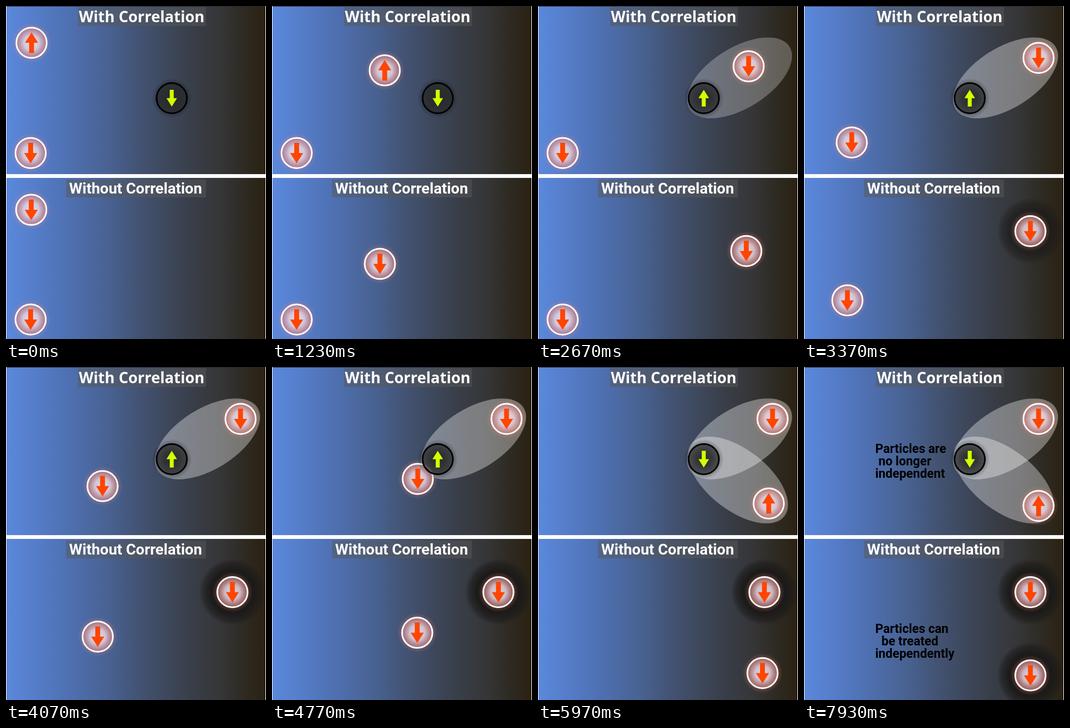
These frames come from a looping animation (480 px wide and 616 px high, 7960 ms). An HTML page:

```html
<!DOCTYPE html>
<html lang="en">
<head>
<meta charset="utf-8">
<title>Particle correlation</title>
<style>
  html, body { margin: 0; width: 100%; height: 100%; overflow: hidden; background: #fff; }
  svg { display: block; width: 480px; height: 616px; }
  text { white-space: pre; }
  .title { font-weight: 700; font-size: 28px; fill: #fff; }
  .wide { font-family: "Open Sans", "Noto Sans", sans-serif; }
  .plain { font-family: Roboto, Arial, sans-serif; }
  .note { font: 700 23px Roboto, Arial, sans-serif; fill: #000; }
  .label { fill: rgb(89, 89, 89); fill-opacity: .5; }
  .orbital { fill: #fff; fill-opacity: .35; }
</style>
</head>
<body>
<svg viewBox="0 0 480 616">
  <defs>
    <linearGradient id="sky" gradientUnits="userSpaceOnUse" x1="1" x2="479">
      <stop offset="0" stop-color="#5b88dc"/>
      <stop offset=".21" stop-color="#5073b7"/>
      <stop offset=".42" stop-color="#475f8c"/>
      <stop offset=".5" stop-color="#435475"/>
      <stop offset=".63" stop-color="#3d475a"/>
      <stop offset=".73" stop-color="#383d46"/>
      <stop offset=".835" stop-color="#353536"/>
      <stop offset=".92" stop-color="#2e2a22"/>
      <stop offset="1" stop-color="#2a2112"/>
    </linearGradient>
    <radialGradient id="core">
      <stop offset="0" stop-color="#eae6f4" stop-opacity=".9"/>
      <stop offset=".5" stop-color="#e4d8e6" stop-opacity=".82"/>
      <stop offset="1" stop-color="#c87878" stop-opacity=".5"/>
    </radialGradient>
    <radialGradient id="warm">
      <stop offset=".72" stop-color="#ff826e" stop-opacity=".3"/>
      <stop offset="1" stop-color="#ff826e" stop-opacity="0"/>
    </radialGradient>
    <radialGradient id="dim">
      <stop offset="0" stop-color="#262829" stop-opacity=".96"/>
      <stop offset=".5" stop-color="#292b2c" stop-opacity=".85"/>
      <stop offset="1" stop-color="#2c2c2c" stop-opacity=".55"/>
    </radialGradient>
    <radialGradient id="shade">
      <stop offset=".72" stop-color="#111" stop-opacity=".35"/>
      <stop offset="1" stop-color="#111" stop-opacity="0"/>
    </radialGradient>
    <radialGradient id="hole">
      <stop offset="0" stop-color="#1b1a19"/>
      <stop offset=".65" stop-color="#1b1a19" stop-opacity=".95"/>
      <stop offset=".85" stop-color="#1b1a19" stop-opacity=".55"/>
      <stop offset="1" stop-color="#1b1a19" stop-opacity="0"/>
    </radialGradient>
    <g id="ball">
      <circle r="37" fill="url(#warm)"/>
      <circle r="28" fill="url(#core)" stroke="#fff" stroke-width="3"/>
    </g>
    <path id="arrow" d="M0-19L12 0H4.5V19H-4.5V0H-12Z"/>
    <clipPath id="upper"><rect x="1" width="478" height="311"/></clipPath>
    <clipPath id="lower"><rect x="1" y="318" width="478" height="298"/></clipPath>
  </defs>

  <g clip-path="url(#upper)">
    <rect x="1" width="478" height="311" fill="url(#sky)"/>
    <rect width="480" height="1" fill="#242830"/>
    <rect class="label" x="133" y="2" width="236" height="35"/>
    <text class="title wide" x="134.5" y="30">With Correlation</text>
    <ellipse id="orbitA" class="orbital" rx="109" ry="56" transform="translate(372 133) rotate(-32)"/>
    <ellipse id="orbitB" class="orbital" rx="109" ry="56" transform="translate(369 209) rotate(38)"/>
    <g id="topBalls"></g>
    <g transform="translate(306 170.5)">
      <circle r="37" fill="url(#shade)"/>
      <circle r="28" fill="url(#dim)" stroke="#000" stroke-width="3"/>
      <use id="pivot" href="#arrow" fill="#d4ff00"/>
    </g>
    <text class="note" id="noteA"><tspan x="131.5" y="159">Particles are</tspan><tspan x="137.5" y="182">no longer</tspan><tspan x="131.5" y="205">independent</tspan></text>
  </g>

  <g clip-path="url(#lower)">
    <rect x="1" y="318" width="478" height="298" fill="url(#sky)"/>
    <rect class="label" x="111" y="321" width="258" height="33"/>
    <text class="title plain" x="116.5" y="347">Without Correlation</text>
    <circle id="holeA" cx="418" cy="416" r="62" fill="url(#hole)"/>
    <circle id="holeB" cx="418" cy="570" r="62" fill="url(#hole)"/>
    <g id="lowBalls"></g>
    <text class="note" id="noteB"><tspan x="131.5" y="492">Particles can</tspan><tspan x="143" y="515">be treated</tspan><tspan x="131.5" y="538">independently</tspan></text>
  </g>
</svg>
<script>
const LOOP = 7960;
const $ = id => document.getElementById(id);
const ramp = (t, start, span) => Math.min(1, Math.max(0, (t - start) / span));

// Half turns of the arrows while two particles touch
const spinA = t => ramp(t, 1760, 500);
const spinB = t => ramp(t, 4790, 500);

// Each path: [time, x, y] knots of a cubic in time
const balls = [
  { box: "topBalls", turn: t => 180 * spinA(t),
    knots: [[0, 47, 68], [1230, 208, 119], [2030, 307, 126], [3000, 433, 96]] },
  { box: "topBalls", turn: t => 180 - 180 * spinB(t),
    knots: [[3037, 45.5, 272], [3370, 88, 252.5], [4770, 269, 207], [6025, 433, 257]] },
  { box: "lowBalls", turn: () => 180,
    knots: [[0, 46.5, 377], [1230, 199, 477], [2030, 307, 488.5], [3000, 418, 416.5]] },
  { box: "lowBalls", turn: () => 180,
    knots: [[3037, 45.5, 580], [3370, 80, 544.5], [4770, 268, 491.5], [6010, 418, 570.5]] }
];

const fades = [
  ["orbitA", 2300, 500], ["orbitB", 5280, 500],
  ["holeA", 3000, 500], ["holeB", 6020, 500],
  ["noteA", 6040, 500], ["noteB", 6040, 500]
];

function place(knots, time) {
  const t = Math.min(knots[3][0], Math.max(knots[0][0], time));
  let x = 0, y = 0;
  for (const a of knots) {
    let w = 1;
    for (const b of knots) if (b !== a) w *= (t - b[0]) / (a[0] - b[0]);
    x += w * a[1];
    y += w * a[2];
  }
  return [x, y];
}

function add(parent, tag, attrs) {
  const el = document.createElementNS("http://www.w3.org/2000/svg", tag);
  for (const k in attrs) el.setAttribute(k, attrs[k]);
  return parent.appendChild(el);
}

for (const b of balls) {
  b.group = add($(b.box), "g", {});
  add(b.group, "use", { href: "#ball" });
  b.arrow = add(b.group, "use", { href: "#arrow", fill: "#ff4500" });
}

function draw(t) {
  for (const b of balls) {
    const [x, y] = place(b.knots, t);
    b.group.setAttribute("transform", `translate(${x} ${y})`);
    b.arrow.setAttribute("transform", `rotate(${b.turn(t)})`);
  }
  const angle = 180 - 180 * spinA(t) + 180 * spinB(t);
  $("pivot").setAttribute("transform", `rotate(${angle}) scale(.81)`);
  for (const [id, start, span] of fades) $(id).setAttribute("opacity", ramp(t, start, span));
}

const begin = performance.now();
function tick() {
  draw((performance.now() - begin) % LOOP);
  requestAnimationFrame(tick);
}
tick();
</script>
</body>
</html>
```
